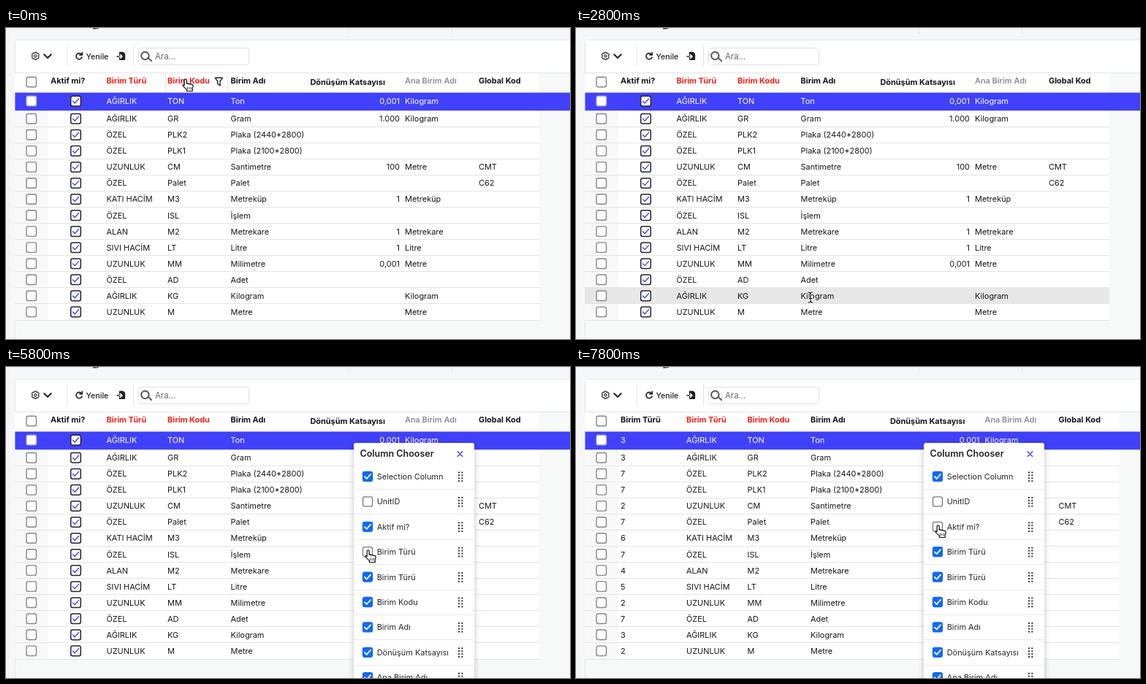
Recreate the animation shown at these times as an HTML page with a canvas. Size 772 by 426 pixels, loop 8 s.

```html
<!DOCTYPE html>
<html lang="tr">
<head>
<meta charset="utf-8">
<style>
html, body { margin: 0; width: 100%; height: 100%; overflow: hidden; background: #f5f6f7; }
canvas { display: block; }
</style>
</head>
<body>
<canvas id="stage" width="772" height="426"></canvas>
<script>
const ctx = document.getElementById('stage').getContext('2d');
const W = 772, H = 426, LOOP = 8000, STEP = 200;
const INK = '#16161a', RED = '#f5221d', BLUE = '#4141fb', ICON = '#6a7ddc', PALE = '#a9b3e8', LINE = '#e3e4e7';

const TYPE_ID = { 'AĞIRLIK': 3, 'ÖZEL': 7, 'UZUNLUK': 2, 'KATI HACİM': 6, 'ALAN': 4, 'SIVI HACİM': 5 };
// type, code, name, factor, base unit, global code
const ROWS = [
  ['AĞIRLIK', 'TON', 'Ton', '0,001', 'Kilogram', ''],
  ['AĞIRLIK', 'GR', 'Gram', '1.000', 'Kilogram', ''],
  ['ÖZEL', 'PLK2', 'Plaka (2440*2800)', '', '', ''],
  ['ÖZEL', 'PLK1', 'Plaka (2100*2800)', '', '', ''],
  ['UZUNLUK', 'CM', 'Santimetre', '100', 'Metre', 'CMT'],
  ['ÖZEL', 'Palet', 'Palet', '', '', 'C62'],
  ['KATI HACİM', 'M3', 'Metreküp', '1', 'Metreküp', ''],
  ['ÖZEL', 'ISL', 'İşlem', '', '', ''],
  ['ALAN', 'M2', 'Metrekare', '1', 'Metrekare', ''],
  ['SIVI HACİM', 'LT', 'Litre', '1', 'Litre', ''],
  ['UZUNLUK', 'MM', 'Milimetre', '0,001', 'Metre', ''],
  ['ÖZEL', 'AD', 'Adet', '', '', ''],
  ['AĞIRLIK', 'KG', 'Kilogram', '', 'Kilogram', ''],
  ['UZUNLUK', 'M', 'Metre', '', 'Metre', '']
];
const COLUMN_X = [137.5, 221, 307.5, 539, 546, 647];
const HEADERS = [
  ['Birim Türü', 137.5, 72, RED], ['Birim Kodu', 221, 72, RED], ['Birim Adı', 307.5, 72, INK],
  ['Dönüşüm Katsayısı', 416.5, 74.3, INK], ['Ana Birim Adı', 546, 72, '#8b8b8f'], ['Global Kod', 647, 72, INK]
];
const MENU = [
  [90, 'Artan Sırala', 'sortUp'], [122, 'Azalan Sırala', 'sortDown'], [154, 'Sıralamayı Temizle', 'cross', true],
  [194, 'Bu Sütuna Göre Grupla', 'group'], [226, 'Gruplama Temizle', 'layers', true], [258, 'Grup Paneli', 'panel'],
  [298, 'Sütunu Gizle', 'hide'], [330, 'Tüm Sütunları En İyi Boyutla', 'width'], [362, 'Sütun Seçici', 'columns'],
  [402, 'Sütunu Sola Sabitle', 'anchor']
];
const CHOICES = ['Selection Column', 'UnitID', 'Aktif mi?', 'Birim Türü', 'Birim Türü', 'Birim Kodu',
  'Birim Adı', 'Dönüşüm Katsayısı', 'Ana Birim Adı'];
// time, x, y, shape
const POINTER = [
  [0, 243, 70, 'hand'], [1200, 243, 70, 'hand'], [2000, 318, 372, 'hand'], [2400, 321, 369, 'beam'],
  [2800, 321, 369, 'beam'], [3600, 325, 369, 'beam'], [3800, 332, 362, 'arrow'], [4600, 502, 240, 'arrow'],
  [5000, 493, 251, 'hand'], [6000, 493, 251, 'hand'], [6200, 496, 236, 'arrow'], [6400, 496, 224, 'arrow'],
  [6800, 493, 217, 'hand'], [8000, 493, 217, 'hand']
];
const ICONS = {
  sortUp: 'M-3.5 5V-5M-5.5 3l2 2.2 2-2.2M1.5-.8 3.5-5.2 5.5-.8M2.2-2.2h2.6M2 1.5h3.2L2 5h3.5',
  sortDown: 'M-3.5 5V-5M-5.5-3l2-2.2 2 2.2M2-5h3.2L2-1.5h3.5M1.5 5.2 3.5.8 5.5 5.2M2.2 3.8h2.6',
  cross: 'M-3-3 3 3M3-3-3 3',
  group: 'M-5.5-4.5H5.5V4.5H-5.5ZM-3-2.3H1V1H-3ZM-.8 1V2.5H3V-.6H1M-6.3-5h1.4M4.9-5h1.4M-6.3 5h1.4M4.9 5h1.4',
  panel: 'M-5.3-4.5H5.3V4.5H-5.3ZM0-4.5V4.5M-5.3 0H5.3',
  hide: 'M-6 0Q0-8 6 0Q0 8-6 0M-1.8-1a2 2 0 1 0 3.6 1.5M-6-5 6 5',
  width: 'M-6 0H6M-3.5-2.5-6 0-3.5 2.5M3.5-2.5 6 0 3.5 2.5',
  anchor: 'M-3-3.4a1.4 1.4 0 1 0 .1 0M-3-.8V5M-6.5 1.5Q-6 5-3 5Q0 5 .5 1.5M2 1H6V4.5H2ZM2.7 1V-.7Q4-2.2 5.3-.7V1',
  gear: 'M-1.2-5H1.2L1.7-3.4 3.3-4 5-1.7 3.9 0 5 1.7 3.3 4 1.7 3.4 1.2 5H-1.2L-1.7 3.4-3.3 4-5 1.7-3.9 0-5-1.7-3.3-4-1.7-3.4ZM1.6 0A1.6 1.6 0 1 0 1.6.1'
};
const HAND = 'M1.1 1.6Q1.1-.1 2.6-.1T4.2 1.6V6.2L5.8 5.8 7.3 6.6 9 6.4 10.4 7.4 12 7.4Q13.2 7.8 13.2 9.2L12.2 13.2V16.5H4.4V14.4L.2 10.4Q-1.8 8.2-.3 7.6L1.2 8.6Z';
const ARROW = 'M0 0V13L3 10.3 5.2 15.6 7.8 14.5 5.6 9.4H9.7Z';

const rowY = i => i ? 124.2 + 22.05 * (i - 1) : 100;

function text(str, x, mid, size = 10.95, color = INK, weight = 400, align = 'left') {
  ctx.font = `${weight} ${size}px Inter, sans-serif`;
  ctx.textAlign = align;
  ctx.fillStyle = color;
  ctx.fillText(str, x, mid + 4);
}
function rect(x, y, w, h, color) {
  ctx.fillStyle = color;
  ctx.fillRect(x, y, w, h);
}
function box(x, y, w, h, r, fill, stroke, width = 1) {
  ctx.beginPath();
  ctx.roundRect(x, y, w, h, r);
  if (fill) { ctx.fillStyle = fill; ctx.fill(); }
  if (stroke) { ctx.strokeStyle = stroke; ctx.lineWidth = width; ctx.stroke(); }
}
function draw(d, x, y, { stroke, fill, width = 1.3 }) {
  const path = new Path2D(d);
  ctx.save();
  ctx.translate(x, y);
  ctx.lineCap = ctx.lineJoin = 'round';
  if (fill) { ctx.fillStyle = fill; ctx.fill(path); }
  if (stroke) { ctx.strokeStyle = stroke; ctx.lineWidth = width; ctx.stroke(path); }
  ctx.restore();
}
function tick(x, y, color, width = 1.6) {
  draw('M-4 .2-1.3 3 4-3', x, y, { stroke: color, width });
}
function popup(x, y, w) {
  ctx.save();
  ctx.shadowColor = 'rgba(0,0,0,.24)';
  ctx.shadowBlur = 9;
  ctx.shadowOffsetY = 2;
  box(x, y, w, H, 3, '#fff');
  ctx.restore();
}

function pointerAt(t) {
  const i = Math.max(0, POINTER.findLastIndex(k => k[0] <= t));
  const a = POINTER[i], b = POINTER[Math.min(i + 1, POINTER.length - 1)];
  const p = b === a ? 0 : (t - a[0]) / (b[0] - a[0]);
  const e = p * p * (3 - 2 * p);
  return { x: a[1] + (b[1] - a[1]) * e, y: a[2] + (b[2] - a[2]) * e, shape: a[3] };
}

function drawToolbar() {
  draw(ICONS.gear, 40.3, 38.3, { stroke: '#333', width: 1.2 });
  draw('M-4.8-2.3 0 2.5 4.8-2.3', 57, 38.5, { stroke: '#222', width: 2 });
  rect(83, 24, 1, 29, LINE);
  draw('M3.6-2A4.1 4.1 0 1 0 4 1.5M4.3-4.8V-1.6H1', 100, 38.5, { stroke: '#222', width: 1.7 });
  text('Yenile', 109.5, 38.5, 10.7, '#222', 500);
  draw('M-2.5-5H2L4.5-2.5V5H-2.5Z', 158, 38.3, { stroke: '#222', fill: '#222' });
  draw('M-5 1H1M-1-1.5 1.5 1-1 3.5', 157.5, 38, { stroke: '#fff', width: 1.5 });
  draw('M-5.5 1H-3', 157.5, 38, { stroke: '#222', width: 1.5 });
  rect(174, 24, 1, 29, LINE);
  box(181.5, 27.5, 151, 23, 4, '#fff', '#dedfe3');
  draw('M3.5-1A5.2 5.2 0 1 1 3.4-1.5M2.6 2.7 7.2 7', 192, 38.2, { stroke: '#555', width: 1.9 });
  text('Ara...', 204, 39, 11.4, '#666');
}

function drawTable(s) {
  const end = Math.min(W, 730 + s.shift);
  rect(12, 61, end - 12, 339, '#fff');
  rect(12, 113, 45, 287, '#f8f8f9');
  rect(12, 61, W - 12, 1, LINE);
  rect(12, 88, W - 12, 1, LINE);
  box(28, 67.3, 13.5, 13.5, 2.5, '#fff', '#85868b', 1.4);
  if (s.active) text('Aktif mi?', 61, 72, 10.9, INK, 700);
  if (s.idX) text('Birim Türü', s.idX, 72, 10.9, INK, 700);
  for (const [label, x, y, color] of HEADERS) {
    text(label, x + s.shift, y, 10.9, color, color[1] === '8' ? 600 : 700);
  }
  if (s.headerHover) {
    rect(218, 63, 1, 25, LINE);
    rect(303, 63, 1, 25, LINE);
    draw('M-5-5.2H5L1.7-.5V5.3L-1.7 3V-.5Z', 291.3, 73.5, { stroke: '#222', width: 1.4 });
  }
  ROWS.forEach((row, i) => {
    const y = rowY(i), color = i ? INK : '#fff';
    if (!i) rect(12.4, 88.6, W - 12, 24.6, BLUE);
    else {
      if (i === s.hoverRow) rect(12, y - 11, end - 12, 22, '#e7e7e8');
      rect(12, Math.round(y + 10.7), end - 12, 1, LINE);
    }
    box(28, y - 6.7, 13.5, 13.5, 2.5, '#fff', i ? '#85868b' : '#b0b0bc', 1.4);
    if (s.active) {
      box(88.7, y - 6.7, 13.6, 13.6, 2.5, '#fff', '#25252f', 1.5);
      tick(95.5, y, BLUE, 1.35);
    }
    if (s.idX) text(TYPE_ID[row[0]], s.idX, y, 10.95, color);
    row.forEach((cell, c) => text(cell, COLUMN_X[c] + s.shift, y, 10.95, color, 400, c === 3 ? 'right' : 'left'));
  });
}

function drawMenuIcon(name, y, color) {
  const x = 266;
  if (name === 'layers') {
    for (const dy of [3, 0, -3]) draw('M-6 0 0-2.8 6 0 0 2.8Z', x, y + dy, { fill: color, stroke: '#fff', width: .7 });
  } else if (name === 'columns') {
    box(x - 5.3, y - 4.5, 10.6, 9, 1, null, color, 1.4);
    rect(x - 5.5, y - 5, 11, 3, color);
    rect(x - .7, y - 4, 1.4, 8, color);
  } else draw(ICONS[name], x, y, { stroke: color, width: 1.4 });
}

function drawMenu(p) {
  popup(245, 70, 209);
  for (const [y, label, icon, off] of MENU) {
    if (Math.abs(p.y - y) < 16) box(246, y - 15, 126, 30, 3, '#fcfcfd');
    drawMenuIcon(icon, y, off ? PALE : ICON);
    text(label, 288.7, y, 11.35, off ? '#9a9a9f' : '#38383e', 500);
  }
  for (const y of [174, 278, 382]) rect(245, y, 209, 1, '#e4e5e8');
}

function drawChooser(s) {
  popup(476, 104, 165);
  text('Column Chooser', 484.5, 119, 12.5, '#22232a', 600);
  draw('M-3.3-3.3 3.3 3.3M3.3-3.3-3.3 3.3', 621.5, 119.2, { stroke: '#4654e6', width: 1.5 });
  CHOICES.forEach((label, i) => {
    const y = 150 + 34.4 * i;
    const on = i === 3 ? !!s.idX : i === 2 ? s.active : i !== 1;
    const fill = s.hoverChoice === i ? '#0b4fb5' : '#1269f5';
    box(488.5, y - 6.5, 13, 13, 2.5, on ? fill : '#fff', on ? fill : '#77787d', 1.3);
    if (on) tick(495, y, '#fff', 1.8);
    text(label, 507.7, y, 10.95, '#25262c');
    for (let d = 0; d < 8; d++) rect(619 + d % 2 * 4.4, y - 6.5 + (d >> 1) * 3.9, 2, 2, '#333');
    rect(476, Math.round(y + 17), 165, 1, '#e9eaed');
  });
}

function drawPointer({ x, y, shape }) {
  if (shape === 'beam') {
    const d = 'M-3-7Q0-7 0-5Q0-7 3-7M0-5V5M-3 7Q0 7 0 5Q0 7 3 7M-1.8 1.5H1.8';
    draw(d, x, y, { stroke: '#fff', width: 2.6 });
    draw(d, x, y, { stroke: '#111', width: 1.2 });
  } else if (shape === 'arrow') {
    draw(ARROW, x, y, { fill: '#111', stroke: '#fff', width: 1 });
  } else {
    draw(HAND, x, y, { fill: '#fff', stroke: '#111', width: 1.2 });
    draw('M5.5 11V14M7.9 11V14M10.3 11V14', x, y, { stroke: '#111', width: .8 });
  }
}

function render(t) {
  const p = pointerAt(t);
  const menu = t >= 600 && t < 2400, chooser = t >= 3200;
  const active = t < 7400;
  const idX = t < 6000 ? 0 : active ? 137.5 : 61;
  const overChooser = chooser && p.x > 476;
  const state = {
    active, idX,
    shift: !idX ? 0 : active ? 90 : 13.5,
    headerHover: t < 600,
    hoverRow: menu || overChooser ? -1 : ROWS.findIndex((r, i) => i && Math.abs(p.y - rowY(i)) < 11),
    hoverChoice: overChooser && p.x < 502 ? Math.round((p.y - 150) / 34.4) : -1
  };
  rect(0, 0, W, H, '#f5f6f7');
  rect(3, 0, 1, H, '#fbeeea');
  rect(0, 0, W, 1, '#f8efea');
  for (const x of [469, 610]) rect(x, 0, 1, 8, '#eedfdd');
  draw('M0 0H2M6.5 0Q6.5 1-.5 1', 120, 0, { stroke: '#333', width: 1.2 });
  box(12.5, 16.5, W, H, 4, '#f7f8f8', '#e5e6e8');
  box(13, 17, W, 44, 3, '#fff');
  drawToolbar();
  drawTable(state);
  if (menu) drawMenu(p);
  if (chooser) drawChooser(state);
  drawPointer(p);
}

function loop(now) {
  render(Math.floor(now % LOOP / STEP) * STEP);
  requestAnimationFrame(loop);
}
requestAnimationFrame(loop);
</script>
</body>
</html>
```
